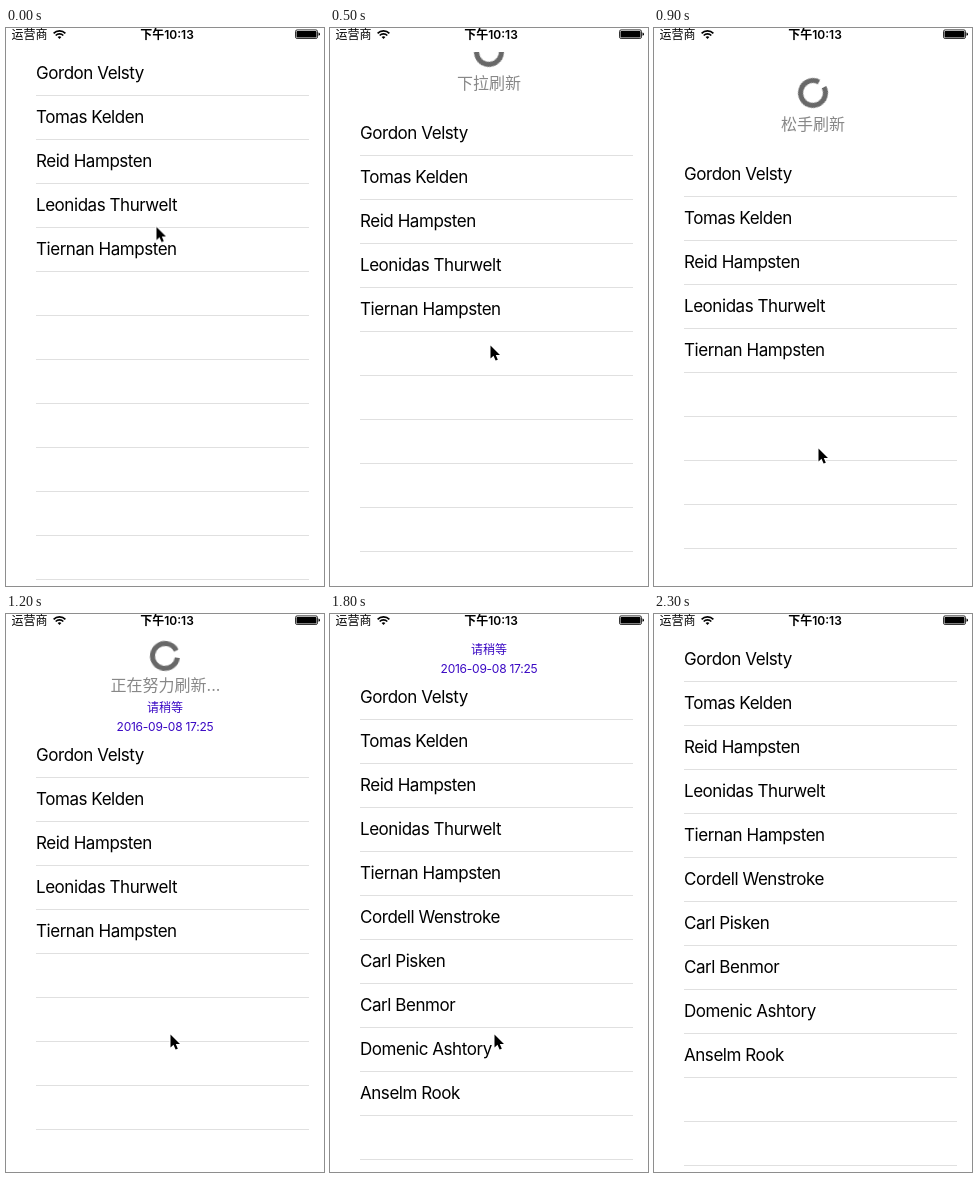
Animation, 318 px wide and 558 px high, one loop 2.4 s. Source, as an HTML page:

```html
<!DOCTYPE html>
<html lang="zh-CN">
<head>
<meta charset="utf-8">
<title>下拉刷新</title>
<style>
  html, body { margin: 0; width: 100%; height: 100%; overflow: hidden; background: #fff; }
  body { position: relative; font-family: Inter, "Noto Sans CJK SC", "Noto Sans CJK", sans-serif; }
  svg { position: absolute; left: 0; top: 0; overflow: visible; }

  .table { position: absolute; left: 0; top: 24px; width: 318px; height: 531px; overflow: hidden; }
  .content { position: absolute; left: 0; top: 0; width: 318px; }
  ul { margin: 0 15px 0 30px; padding: 0; list-style: none; }
  li {
    box-sizing: border-box; height: 44px; line-height: 43px;
    border-bottom: 1px solid #e0e0e0;
    font-size: 17px; letter-spacing: -0.45px; white-space: nowrap; color: #000;
  }

  .header text { text-anchor: middle; fill: #888; font-size: 16px; }
  .header .note { fill: #3a08c4; font-size: 12px; }
  .header .date { letter-spacing: -0.25px; }
  .spin { transform-box: fill-box; transform-origin: center; }

  /* The picture advances in 100 ms steps */
  .content, .ring, .spin, .pull, .release, .busy, .more, .cursor {
    animation: 2400ms step-end infinite;
  }
  .content { animation-name: scroll; }
  .ring { animation-name: ring; }
  .spin { animation-name: spin; }
  .pull { animation-name: pull; }
  .release { animation-name: release; }
  .busy { animation-name: busy; }
  .more { animation-name: more; }
  .cursor { animation-name: cursor; }

  @keyframes scroll {
    0% { transform: translateY(0); }
    4.16% { transform: translateY(5px); }
    8.33% { transform: translateY(11px); }
    12.5% { transform: translateY(20px); }
    16.66% { transform: translateY(40px); }
    20.83% { transform: translateY(60px); }
    25% { transform: translateY(77px); }
    33.33% { transform: translateY(90px); }
    37.5% { transform: translateY(101px); }
    45.83% { transform: translateY(99px); }
    50% { transform: translateY(96px); }
    54.16% { transform: translateY(94px); }
    58.33% { transform: translateY(93px); }
    70.83% { transform: translateY(75px); }
    75% { transform: translateY(38px); }
    79.16% { transform: translateY(8px); }
    83.33%, 100% { transform: translateY(0); }
  }
  @keyframes cursor {
    0% { transform: translate(149px, 197.5px); }
    4.16% { transform: translate(150px, 204px); }
    8.33% { transform: translate(151px, 215px); }
    12.5% { transform: translate(153px, 230px); }
    16.66% { transform: translate(156px, 272px); }
    20.83% { transform: translate(159px, 316px); }
    25% { transform: translate(162px, 357px); }
    33.33% { transform: translate(162px, 391px); }
    37.5% { transform: translate(163px, 419px); }
    79.16% { transform: translate(164px, 417px); }
    83.33% { transform: translate(165px, 411px); }
    87.5% { transform: translate(169px, 345px); }
    91.66% { transform: translate(175px, 232px); opacity: 1; }
    95.83%, 100% { transform: translate(175px, 232px); opacity: 0; }
  }
  @keyframes ring {
    0% { transform: translate(159px, -60px); }
    45.83%, 100% { transform: translate(159px, -78px); }
  }
  @keyframes spin {
    0% { transform: rotate(0); }
    45.83% { transform: rotate(0); animation-timing-function: steps(9, end); }
    83.33%, 100% { transform: rotate(324deg); }
  }
  @keyframes pull { 0% { opacity: 1; } 33.33%, 100% { opacity: 0; } }
  @keyframes release { 0% { opacity: 0; } 33.33% { opacity: 1; } 45.83%, 100% { opacity: 0; } }
  @keyframes busy { 0% { opacity: 0; } 45.83%, 100% { opacity: 1; } }
  @keyframes more { 0% { color: transparent; } 70.83%, 100% { color: #000; } }
</style>
</head>
<body>

<div class="table">
  <div class="content">
    <svg class="header" width="318" height="1">
      <g class="ring">
        <g class="spin">
          <circle r="12.5" fill="none" stroke="#686868" stroke-width="5"
            pathLength="360" stroke-dasharray="326 34" transform="rotate(-28)"/>
        </g>
      </g>
      <text class="pull" x="159" y="-23">下拉刷新</text>
      <text class="release" x="159" y="-23">松手刷新</text>
      <g class="busy">
        <text x="159.5" y="-43">正在努力刷新...</text>
        <text class="note" x="159" y="-22.5">请稍等</text>
        <text class="note date" x="159" y="-2.6">2016-09-08 17:25</text>
      </g>
    </svg>
    <ul>
      <li>Gordon Velsty</li>
      <li>Tomas Kelden</li>
      <li>Reid Hampsten</li>
      <li>Leonidas Thurwelt</li>
      <li>Tiernan Hampsten</li>
      <li class="more">Cordell Wenstroke</li>
      <li class="more">Carl Pisken</li>
      <li class="more">Carl Benmor</li>
      <li class="more">Domenic Ashtory</li>
      <li class="more">Anselm Rook</li>
      <li></li>
      <li></li>
    </ul>
  </div>
</div>

<svg width="318" height="24" font-size="12">
  <text x="5.5" y="10.8">运营商</text>
  <g fill="none" stroke="#000" stroke-width="1.6">
    <path d="M47.6 5.4 A8.2 8.2 0 0 1 59.4 5.4"/>
    <path d="M49.7 7.5 A5.3 5.3 0 0 1 57.3 7.5"/>
    <path d="M53.5 11 L51.6 9.1 A2.7 2.7 0 0 1 55.4 9.1 Z" fill="#000" stroke="none"/>
  </g>
  <text x="161" y="10.6" text-anchor="middle" font-weight="600">下午10:13</text>
  <rect x="289.5" y="1.9" width="22" height="8.6" rx="1.6" fill="none" stroke="#000" stroke-width=".8"/>
  <rect x="290.5" y="2.9" width="20" height="6.6" rx=".8"/>
  <path d="M312.5 4.6 q1.5 .3 1.5 1.6 t-1.5 1.6 Z"/>
</svg>

<svg class="cursor" width="13" height="18">
  <path d="M1.5 1.5 V14.6 L4.5 11.8 L6.6 16.6 L8.8 15.7 L6.8 11 H11 Z"
    stroke="#fff" stroke-width="2" paint-order="stroke"/>
</svg>

</body>
</html>
```
